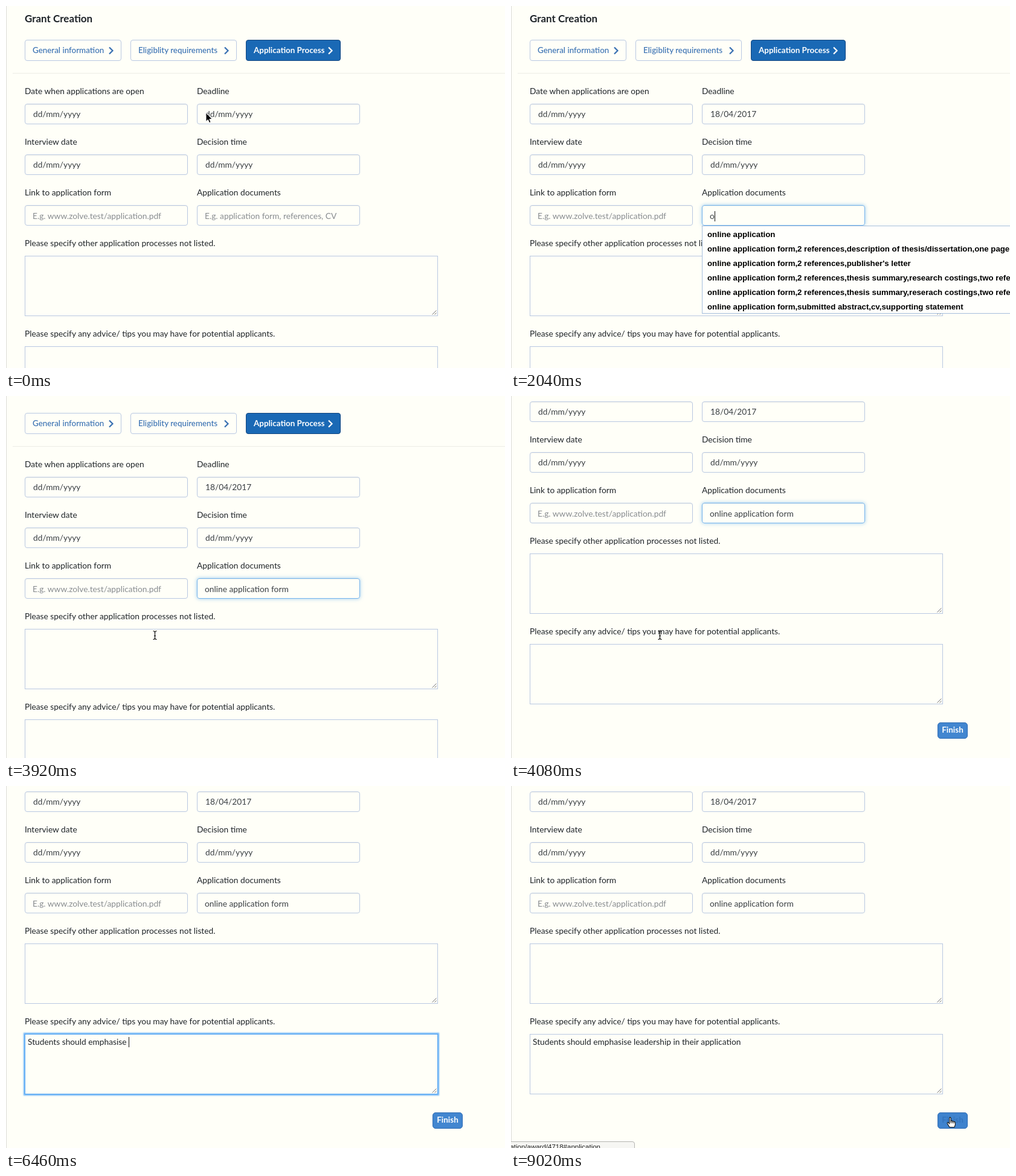
Recreate the animation shown at these times as an HTML page. Size 826 px wide and 600 px high, loop 9040 ms.

```html
<!DOCTYPE html>
<html lang="en">
<head>
<meta charset="utf-8">
<title>Grant form</title>
<style>
  html, body { margin: 0; width: 100%; height: 100%; overflow: hidden; background: #fffff8; }
  #stage { position: relative; width: 826px; height: 600px; overflow: hidden; background: #fffff8;
    font: 13.75px/20px Lato, "Open Sans", sans-serif; color: #1f2429; }
  #stage * { box-sizing: border-box; }
  #stage div, svg { position: absolute; white-space: pre; }
  #edge { left: 0; top: 0; width: 1px; height: 600px; background: #dcdcd8; }
  #page { left: 0; top: 0; width: 826px; height: 760px; }
  h1 { position: absolute; left: 31px; top: 11px; margin: 0; font-size: 17px; line-height: 20px; font-weight: 700; }
  .rule { left: 11px; top: 111px; width: 815px; height: 1px; background: #ecece6; }
  .tab { top: 56px; height: 35px; padding-left: 12px; line-height: 33px; font-size: 13.4px; font-weight: 500;
    color: #3870b2; border: 1px solid #b9c8e2; border-radius: 4px; }
  .tab svg { right: 11px; top: 10px; }
  .tab.on { color: #fff; background: #1a69b5; border-color: #13467f; font-weight: 700; }
  .field { width: 270px; height: 34px; padding-left: 12px; line-height: 33px; color: #3a3f44;
    border: 1px solid #b9c8e2; border-radius: 4px; box-shadow: inset 0 1px 1px rgba(0,0,0,.05); }
  .date { padding-left: 13px; line-height: 31px; }
  .seg { background: #b3d7fe; }
  .hint { color: #888c90; }
  .field.focus { border-color: #74b3ec; box-shadow: inset 0 1px 1px rgba(0,0,0,.05), 0 0 6px rgba(102,175,233,.65); }
  .area { left: 31px; width: 684px; height: 100px; padding: 2px 4px; border: 1px solid #b9c8e2; }
  .area svg { right: 0; bottom: 0; }
  .area.focus { border-color: #58a6f2; box-shadow: 0 0 2px 2px #6db4f7; }
  .caret { display: inline-block; width: 1px; height: 17px; margin-right: -1px; background: #111; vertical-align: -4px; }
  #menu { left: 316px; top: 364px; width: 530px; padding-top: 1px; background: #fffffc; border: 1px solid #a5bedc; overflow: hidden;
    font: bold 13.22px/24px "Liberation Sans", Arial, sans-serif; color: #000; }
  #menu p { margin: 0; height: 24px; padding-left: 8px; line-height: 25px; }
  #menu p.hot { background: #afd5fc; margin-top: -1px; margin-bottom: 1px; }
  #finish { left: 706px; top: 694px; width: 50px; height: 27px; line-height: 23px; text-align: center; font-size: 13.5px;
    font-weight: 700; color: #fff; background: #4286d0; border: 1px solid #2f6cb4; border-radius: 5px; }
  #finish.hover { color: #3474bd; background: #3f83ce; }
  #status { left: -2px; top: 589px; width: 207px; height: 20px; padding-right: 56px; background: #f6f6f3;
    border: 1px solid #b4b4b2; border-radius: 0 4px 0 0; font: 11.5px/16px "Liberation Sans", Arial, sans-serif; color: #222;
    display: flex; justify-content: flex-end; }
</style>
</head>
<body>
<div id="stage">
  <div id="page"></div>
  <div id="edge"></div>
  <div id="status">ation/award/4718#application</div>
  <svg id="arrow" width="14" height="20"><path d="M1 1V15.5L4.3 12.4 6.6 17.6 9 16.6 6.8 11.5H11.2Z" fill="#000" stroke="#fff"/></svg>
  <svg id="beam" width="9" height="17"><path d="M1.5 1.5Q4.5 1.5 4.5 4V13Q4.5 15.5 1.5 15.5M7.5 1.5Q4.5 1.5 4.5 4V13Q4.5 15.5 7.5 15.5M3 9.5H6" fill="none" stroke="#111" stroke-width="1.2"/></svg>
  <svg id="hand" width="18" height="20"><path d="M5 17.5 1.3 11.5Q.8 9.5 2.6 9.6L4.7 11.6V2Q5.8.2 7 2V7.4Q8.5 6.2 9.6 7.8 11 6.8 12 8.5 13.7 7.8 14.4 9.6V13.5L13 17.5Z" fill="#fff" stroke="#111" stroke-width="1.1"/><path d="M7.2 7.4V11M9.7 8V11M12.1 8.7V11.3" stroke="#111"/></svg>
</div>
<script>
const LOOP = 9040, TICK = 20;
const $ = id => document.getElementById(id);
const box = (cls, x, y, inner, more = '') => `<div class="${cls}" style="left:${x}px;top:${y}px;${more}">${inner}</div>`;
const label = (x, y, text) => box('', x, y - 10, text);
const blank = 'dd/mm/yyyy';
const chevron = '<svg width="10" height="14"><path d="M2 1.5 7.5 7 2 12.5" fill="none" stroke="currentColor" stroke-width="2.2"/></svg>';
const grip = '<svg width="10" height="10"><path d="M1.5 8.5 8.5 1.5M5.5 8.5 8.5 5.5" stroke="#777"/></svg>';
const tab = (x, w, text, on = '') => box('tab ' + on, x, 56, text + chevron, `width:${w}px`);
const area = (y, id) => `<div class="area" id="${id}" style="top:${y}px"><span></span>${grip}</div>`;

$('page').innerHTML = '<h1>Grant Creation</h1><div class="rule"></div>'
  + tab(31, 160, 'General information') + tab(206, 176, 'Eligiblity requirements') + tab(397, 157, 'Application Process', 'on')
  + label(31, 141, 'Date when applications are open') + label(316, 141, 'Deadline')
  + label(31, 225, 'Interview date') + label(316, 225, 'Decision time')
  + label(31, 309, 'Link to application form') + label(316, 309, 'Application documents')
  + box('field date', 31, 162, blank) + '<div class="field date" id="deadline" style="left:316px;top:162px"></div>'
  + box('field date', 31, 246, blank) + box('field date', 316, 246, blank)
  + box('field hint', 31, 330, 'E.g. www.zolve.test/application.pdf')
  + '<div class="field" id="docs" style="left:316px;top:330px"></div>'
  + label(31, 393, 'Please specify other application processes not listed.') + area(414, 'other')
  + label(31, 543, 'Please specify any advice/ tips you may have for potential applicants.') + area(564, 'advice')
  + '<div id="finish">Finish</div><div id="menu"></div>';

const docText = 'online application form';
const adviceText = 'Students should emphasise leadership in their application';
const options = ['', ' form,2 references,description of thesis/dissertation,one page proposal',
  " form,2 references,publisher's letter",
  ' form,2 references,thesis summary,research costings,two references',
  ' form,2 references,thesis summary,reserach costings,two references',
  ' form,submitted abstract,cv,supporting statement'].map(s => 'online application' + s);

// time, day, month, year, selected part
const dateSteps = [
  [0, 'dd', 'mm', 'yyyy', -1], [320, 'dd', 'mm', 'yyyy', 0], [520, '01', 'mm', 'yyyy', 0], [640, '18', 'mm', 'yyyy', 1],
  [820, '18', '04', 'yyyy', 2], [960, '18', '04', '0002', 2], [1060, '18', '04', '0020', 2],
  [1160, '18', '04', '0201', 2], [1260, '18', '04', '2017', 2], [1640, '18', '04', '2017', -1]];
// time, x, y, pointer shape
const mouse = [
  [0, 331, 177, 'arrow'], [420, 331, 177, ''], [1300, 331, 180, 'arrow'], [1500, 362, 335, 'beam'], [1580, 365, 347, 'beam'],
  [1860, 365, 347, ''], [3320, 365, 347, 'beam'], [3480, 364, 374, 'arrow'], [3700, 364, 374, 'arrow'], [3860, 246, 396, 'beam'],
  [4140, 246, 396, 'beam'], [4360, 150, 440, 'beam'], [4880, 150, 440, ''], [8340, 150, 440, 'beam'],
  [8600, 520, 514, 'arrow'], [8800, 726, 549, 'hand'], [LOOP, 726, 549, 'hand']];
const scroll = [[0, 0], [3860, 0], [3920, 28], [4000, 98], [4060, 146], [4080, 153], [LOOP, 153]];
const offsets = { arrow: [1, 1], beam: [4, 8], hand: [5, 1] };

const at = (keys, t) => keys.findLast(k => k[0] <= t);
function tween(keys, t, col) {
  const a = at(keys, t), b = keys[keys.indexOf(a) + 1] || a;
  return a[col] + (b[col] - a[col]) * (t - a[0]) / (b[0] - a[0] || 1);
}
const typed = (t, from, to, n) => t < from ? 0 : Math.min(n, 1 + Math.floor((t - from) / (to - from) * (n - 1)));
const between = (t, a, b) => t >= a && t < b;
const show = (el, on) => { el.style.display = on ? '' : 'none'; };
const caret = on => on ? '<i class="caret"></i>' : '';
function fill(el, html) {
  if (el.shown !== html) { el.shown = html; el.innerHTML = html; }
}

function render(t) {
  $('page').style.top = -Math.round(tween(scroll, t, 1)) + 'px';

  const [, day, month, year, part] = at(dateSteps, t);
  fill($('deadline'), [day, month, year].map((s, i) => i === part ? `<span class="seg">${s}</span>` : s).join('/'));
  $('deadline').classList.toggle('focus', between(t, 320, 1640));

  const n = t < 2060 ? typed(t, 1860, 1861, 1) : 1 + typed(t, 2060, 3160, docText.length - 1);
  const docCaret = caret(between(t, 1640, 3720));
  fill($('docs'), n ? docText.slice(0, n) + docCaret
    : docCaret + '<span class="hint">E.g. application form, references, CV</span>');
  $('docs').classList.toggle('focus', between(t, 1640, 4560));

  const hot = t >= 3480 ? 0 : -1;
  const matches = options.filter(s => s.startsWith(docText.slice(0, n)));
  fill($('menu'), matches.map((s, i) => `<p${i === hot ? ' class="hot"' : ''}>${s}</p>`).join(''));
  $('menu').style.height = matches.length * 24 + 2 + 'px';
  show($('menu'), between(t, 1860, 3720));

  const m = typed(t, 4900, 6180, 26) + typed(t, 6580, 8160, adviceText.length - 26);
  const writing = between(t, 4560, 8940);
  fill($('advice').firstChild, adviceText.slice(0, m) + caret(writing));
  $('advice').classList.toggle('focus', writing);

  $('finish').classList.toggle('hover', t >= 8780);
  show($('status'), t >= 8880);

  const shape = at(mouse, t)[3];
  for (const id in offsets) {
    const [dx, dy] = offsets[id];
    show($(id), id === shape);
    $(id).style.left = Math.round(tween(mouse, t, 1)) - dx + 'px';
    $(id).style.top = Math.round(tween(mouse, t, 2)) - dy + 'px';
  }
}

const start = performance.now();
function frame() {
  const t = (performance.now() - start) % LOOP;
  render(Math.floor(t / TICK) * TICK);
  requestAnimationFrame(frame);
}
frame();
</script>
</body>
</html>
```
